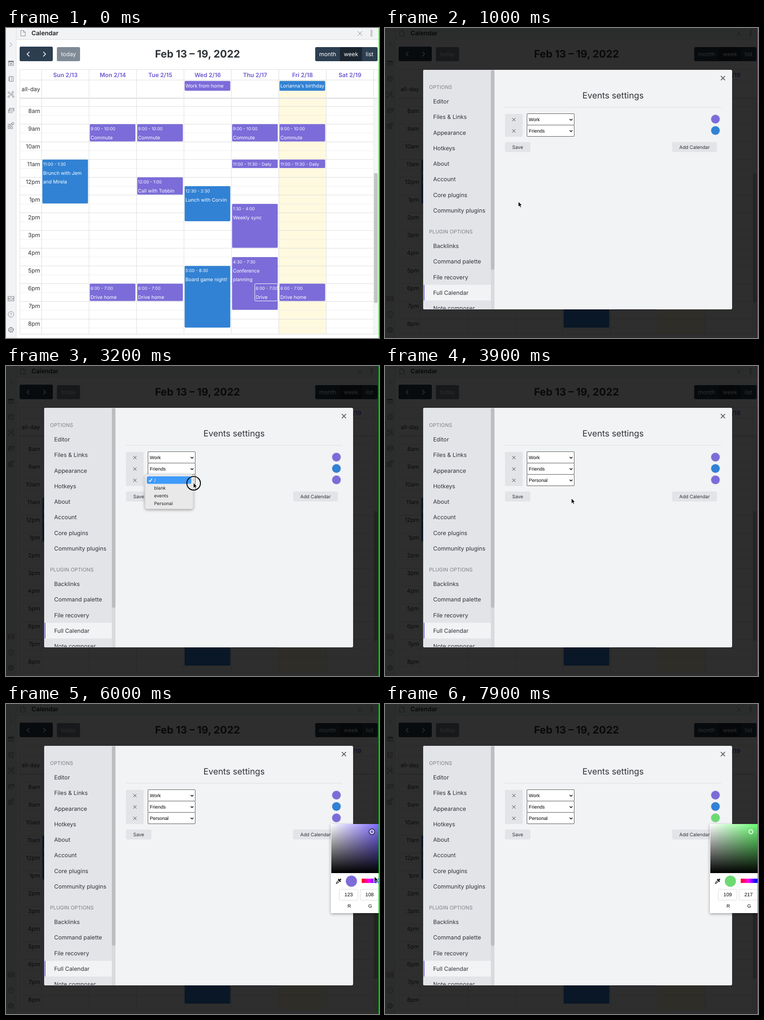
An HTML page that plays this animation: 821 by 682 pixels, repeating every 8000 ms.

```html
<!DOCTYPE html>
<html lang="en">
<head>
<meta charset="utf-8">
<title>Calendar</title>
<style>
html, body { margin: 0; width: 100%; height: 100%; overflow: hidden; background: #fff; }
svg { display: block; width: 821px; height: 682px; }
text { font-family: Inter, sans-serif; text-rendering: geometricPrecision; white-space: pre; }
.arial { font-family: "Liberation Sans", Arial, sans-serif; }
</style>
</head>
<body>
<svg id="stage" viewBox="0 0 821 682" xmlns="http://www.w3.org/2000/svg"></svg>
<script>
const LOOP = 8000, STEP = 100;
const PURPLE = '#7b6cd9', BLUE = '#3182d4', INK = '#2e3338', GRID = '#dddddd', PANEL = '#f2f3f5';
const BODY = 12.6, SMALL = 10.65;

const rect = (x, y, w, h, fill, more = '') =>
  `<rect x="${x}" y="${y}" width="${w}" height="${h}" fill="${fill}" ${more}/>`;
const circle = (x, y, r, fill, more = '') => `<circle cx="${x}" cy="${y}" r="${r}" fill="${fill}" ${more}/>`;
const text = (x, y, s, size, fill = INK, more = '') =>
  `<text x="${x}" y="${y}" font-size="${size}" fill="${fill}" ${more}>${s}</text>`;
const line = (d, color, w = 1, more = '') =>
  `<path d="${d}" fill="none" stroke="${color}" stroke-width="${w}" ${more}/>`;
const cross = (x, y, r, color, w) => line(`M${x - r} ${y - r}l${2 * r} ${2 * r}m0 ${-2 * r}l${-2 * r} ${2 * r}`, color, w);
const MID = 'text-anchor="middle"', END = 'text-anchor="end"';

// Calendar
const colX = c => 78.5 + 104.4 * c;
const hourY = h => 172.5 + 39 * (h - 8);

function eventBox(col, from, to, color, time, lines = [], inset = 0) {
  const x = colX(col) + 1.5 + inset, y = hourY(from), w = 100.5 - inset;
  let s = rect(x, y, w, (to - from) * 39 - 1, color, `rx="2" ${inset ? 'stroke="#fff"' : ''}`);
  s += text(x + 1.8, y + 13.6, time, 9.4, '#fff');
  lines.forEach((l, i) => s += text(x + 1.8, y + 33.6 + 19 * i, l, SMALL, '#fff'));
  return s;
}

function sideIcons() {
  const p = (d, w = 1) => line(d, '#85878a', w);
  return p('M8 31.5l5 5l-5 5') +
    rect(5.5, 72.5, 11, 10, 'none', 'stroke="#85878a"') + rect(5.5, 72.5, 11, 3, '#85878a') + p('M8 79h6', 2) +
    p('M7 106.5h9v11h-9zM5 109h4M5 112h4M5 115h4M11 109h3M11 112h3M11 115h3') +
    p('M11 146l-5-4M11 146l4-5M11 146l-5 5M11 146l5 4M11 146h6') +
    [[11, 146], [6, 142], [15, 141], [6, 151], [16, 151]].map(([x, y]) => circle(x, y, 1.8, PANEL, 'stroke="#85878a"')).join('') +
    p('M7.5 176.5h10v6h-10zM5.5 179v7h9.5M8 179h9', 1.2) +
    p('M4.5 211.5h4v4h-4zM4.5 217.5h4v4h-4zM10.5 217.5h4v4h-4zM10 211h4v4h-4zM13 208h4v4h-4z') +
    p('M4.5 590.5h13v10h-13z', 1.2) + circle(11, 595.5, 2.7, 'none', 'stroke="#85878a"') + p('M6.5 593v5M15.5 593v5') +
    circle(11, 630, 6.3, 'none', 'stroke="#85878a"') + text(11, 633.5, '?', 9.5, '#85878a', MID) +
    circle(11, 664, 5.3, 'none', 'stroke="#85878a" stroke-width="2" stroke-dasharray="2.4 1.76"') +
    circle(11, 664, 4.3, 'none', 'stroke="#85878a"') + circle(11, 664, 1.6, 'none', 'stroke="#85878a"');
}

function calendar() {
  let s = rect(0, 0, 821, 682, '#fff') + rect(0, 0, 821, 25, PANEL) + rect(0, 0, 22, 682, PANEL) +
    line('M22.5 0V682M22 25.5H821', '#dcddde') + sideIcons() +
    line('M32.5 5.5h6l4 4v8h-10zM38.5 5.5v4h4', '#85878a') +
    text(56, 15.7, 'Calendar', 13.6, '#222', 'font-weight="600"') + cross(779, 12, 4.8, '#85878a', 1) +
    [6.5, 11.5, 16.5].map(y => circle(804.5, y, 1.6, 'none', 'stroke="#85878a"')).join('');

  s += rect(30, 41, 73, 32, '#2c3e50', 'rx="3"') +
    line('M51.5 52.5l-5 5l5 5M82 52.5l5 5l-5 5', '#fff', 1.7) +
    rect(112, 42, 51, 31, '#7e8a96', 'rx="3"') + text(137.5, 62, 'today', BODY, '#f6f7f8', MID) +
    text(421.5, 65, 'Feb 13 – 19, 2022', 22.75, INK, MID + ' font-weight="700"') +
    rect(680.5, 42, 137.5, 31, '#2c3e50', 'rx="3"') + rect(735, 42, 48.5, 31, '#1a252f');
  [['month', 708], ['week', 759.3], ['list', 800.3]].forEach(([l, x]) => s += text(x, 62, l, BODY, '#fff', MID));

  s += rect(colX(5), 114, 104.4, 560, '#fff9df');
  let solid = 'M30.5 91.5H818.5V673.5H30.5zM30.5 114.5H818', dots = '';
  for (let c = 0; c < 8; c++) solid += `M${colX(c)} 91.5V673.5`;
  for (let h = 8; h <= 20; h++) {
    solid += `M30.5 ${hourY(h)}H809`;
    dots += `M30.5 ${hourY(h) + 19.5}H809`;
  }
  s += line(solid, GRID) + line(dots, GRID, 1, 'stroke-dasharray="1 1"') +
    rect(31, 153, 787, 3, '#e4e4e4') + rect(809.5, 156, 8.5, 517, '#f6f6f6') +
    rect(810, 319, 8, 286, '#c4c4c4', 'rx="4"');

  'Sun Mon Tue Wed Thu Fri Sat'.split(' ').forEach((d, c) =>
    s += text(colX(c) + 52.2, 107.7, `${d} 2/${13 + c}`, 12.9, '#6c59d0', MID + ' font-weight="600"'));
  s += text(75, 139, 'all-day', BODY, INK, END);
  for (let h = 8; h <= 20; h++)
    s += text(75, hourY(h) + 14.6, (h > 12 ? h - 12 : h) + (h < 12 ? 'am' : 'pm'), BODY, INK, END);

  [[3, PURPLE, 'Work from home'], [5, BLUE, "Lorianna's birthday"]].forEach(([c, fill, label]) =>
    s += rect(colX(c) + 1.5, 116.5, 100.5, 21.5, fill, 'rx="2"') + text(colX(c) + 3.3, 131.2, label, SMALL, '#fff'));
  for (const c of [1, 2, 4, 5]) s += eventBox(c, 9, 10, PURPLE, '9:00 - 10:00', ['Commute']);
  for (const c of [4, 5]) s += eventBox(c, 11, 11.5, PURPLE, '11:00 - 11:30 - Daily');
  for (const c of [1, 2, 5]) s += eventBox(c, 18, 19, PURPLE, '6:00 - 7:00', ['Drive home']);
  return s +
    eventBox(0, 11, 13.5, BLUE, '11:00 - 1:30', ['Brunch with Jem', 'and Mirela']) +
    eventBox(2, 12, 13, PURPLE, '12:00 - 1:00', ['Call with Tobbin']) +
    eventBox(3, 12.5, 14.5, BLUE, '12:30 - 2:30', ['Lunch with Corvin']) +
    eventBox(3, 17, 20.5, BLUE, '5:00 - 8:30', ['Board game night!']) +
    eventBox(4, 13.5, 16, PURPLE, '1:30 - 4:00', ['Weekly sync']) +
    eventBox(4, 16.5, 19.5, PURPLE, '4:30 - 7:30', ['Conference', 'planning']) +
    eventBox(4, 18, 19, PURPLE, '6:00 - 7:00', ['Drive'], 50);
}

// Settings window
function settingsRow(y, label, color, id = '') {
  return rect(264, y - 12, 39, 25, '#e3e4e8', 'rx="2"') + cross(283.7, y + .5, 3.5, INK, 1) +
    rect(312.5, y - 12.5, 104, 25, '#fff', 'rx="1.5" stroke="#555"') +
    text(316.5, y + 3.8, label, 10.5, '#000', `class="arial" ${id && `id="${id}Name"`}`) +
    line(`M406.5 ${y - 1}l3 3l3-3`, '#111', 1.6) +
    circle(727.3, y - .5, 10.4, '#dadce3') + circle(727.3, y - .5, 9.4, color, id && `id="${id}Dot"`);
}

function settings() {
  let s = rect(0, 0, 821, 682, '#000', 'opacity=".82"') + rect(84, 92, 680, 527, PANEL, 'rx="3"') +
    rect(84, 92, 157, 527, '#e3e4e8', 'rx="3"') + rect(233, 92, 8, 527, '#d9dade') +
    rect(233, 93, 8, 439, '#bdbec1', 'rx="4"') +
    rect(85, 565, 148, 34.5, PANEL) + rect(85, 565, 2, 34.5, PURPLE);
  const list = (title, y, items, first) => {
    s += text(97, y, title, 11.1, '#7c7f84', 'letter-spacing=".15"');
    items.split(',').forEach((it, i) => s += text(106, first + 34.28 * i, it, BODY));
  };
  s += '<g clip-path="url(#modalClip)">';
  list('OPTIONS', 134, 'Editor,Files &amp; Links,Appearance,Hotkeys,About,Account,Core plugins,Community plugins', 166);
  list('PLUGIN OPTIONS', 452, 'Backlinks,Command palette,File recovery,Full Calendar,Note composer', 484.2);
  return s + '</g>' + cross(743.8, 110.3, 4.6, '#5c5e62', 1.9) +
    text(502, 155, 'Events settings', 18.8, INK, MID) + line('M264 174.5H740', '#dcddde') +
    settingsRow(201, 'Work', PURPLE) + settingsRow(226, 'Friends', BLUE) +
    `<g id="newRow">${settingsRow(251, '/', PURPLE, 'new')}</g><g id="buttons">` +
    rect(264, 251, 56, 22, '#e3e4e8', 'rx="3"') + text(292, 266, 'Save', 10.4, INK, MID) +
    rect(632, 251, 98.5, 22, '#e3e4e8', 'rx="3"') + text(681.3, 266, 'Add Calendar', 10.4, INK, MID) + '</g>';
}

const MENU = ['/', 'blank', 'events', 'Personal'];
const menu = () => rect(306, 238, 106, 76.5, '#e9e9ea', 'rx="5" stroke="#c4c4c6" stroke-width=".6" filter="url(#shadow)"') +
  rect(310, 243, 98, 16.5, '#3f9bfc', 'id="menuBar" rx="3.5"') +
  line('M314.5 251.5l2.5 3l4.5-7', '#fff', 1.6, 'id="check"') +
  MENU.map((m, i) => text(326, 254.8 + 17 * i, m, 10, '#222', 'class="item"')).join('');

const picker = () => rect(715, 264, 226, 196, '#fff', 'filter="url(#shadow)"') +
  rect(716, 264, 178, 108, '#00f', 'id="field"') + rect(716, 264, 178, 108, 'url(#toWhite)') + rect(716, 264, 178, 108, 'url(#toBlack)') +
  circle(805.3, 281, 6, 'none', 'id="focus" stroke="#111" stroke-width="1.6"') +
  circle(805.3, 281, 4.3, 'none', 'stroke="#fff" stroke-width="1.8"') +
  line('M727 395l1-3l5-5l2 2l-5 5z', '#111', 1.2) + line('M732 386l4 4M734 388l2.5-2.5', '#111', 2.6, 'stroke-linecap="round"') +
  circle(760.2, 389.8, 12.3, PURPLE, 'id="preview"') +
  rect(783, 384.3, 100, 9.4, 'url(#hues)') + circle(814, 389, 5.5, '#00f', 'id="thumb" stroke="#fff" stroke-width="1.2"') +
  [['R', 734], ['G', 780]].map(([l, x]) => rect(x - .5, 407.5, 41, 24, '#fff', 'rx="2" stroke="#dadada"') +
    text(x + 20.3, 423.3, '', 11, '#000', `class="arial" id="num${l}" ${MID}`) +
    text(x + 21.5, 448, l, 10.4, '#000', 'class="arial" ' + MID)).join('');

const stop = (o, c, a = 1) => `<stop offset="${o}" stop-color="${c}" stop-opacity="${a}"/>`;
document.getElementById('stage').innerHTML = `<defs>
  <clipPath id="modalClip">${rect(84, 92, 149, 526, '#000')}</clipPath>
  <filter id="shadow" x="-20%" y="-20%" width="140%" height="140%"><feDropShadow dx="0" dy="2" stdDeviation="3" flood-opacity=".35"/></filter>
  <linearGradient id="toWhite">${stop(0, '#fff') + stop(1, '#fff', 0)}</linearGradient>
  <linearGradient id="toBlack" x2="0" y2="1">${stop(0, '#000', 0) + stop(1, '#000')}</linearGradient>
  <linearGradient id="hues">${[0, 1, 2, 3, 4, 5, 6].map(i => stop(i / 6, `hsl(${360 - 60 * i},100%,50%)`)).join('')}</linearGradient>
  </defs>${calendar()}<g id="settings">${settings()}</g><g id="menu">${menu()}</g><g id="picker">${picker()}</g>
  <rect id="edge" x="820" y="0" width="1" height="682"/>
  ${circle(0, 0, 15, 'none', 'id="ring" stroke="#111" stroke-width="2.2"')}
  <g id="cursor"><path id="arrow" d="M0 0V11.5L2.7 9.1L4.5 13.2L6.5 12.3L4.7 8.3H8.3Z" fill="#000" stroke="#fff" stroke-width=".9"/>
  <path id="hand" d="M-1.2 .8Q0-.6 1.2 .8V4.5L5.5 5.5Q6.5 6 6.3 7.5L5.3 12.5H-1.2L-4.2 8Q-4.5 6.5-3 6.6L-1.2 8Z" fill="#fff" stroke="#111" stroke-width="1"/></g>`;

const el = {};
document.querySelectorAll('[id]').forEach(n => el[n.id] = n);
const items = [...document.querySelectorAll('.item')];
const show = (n, on) => n.setAttribute('display', on ? 'inline' : 'none');
const set = (n, attrs) => { for (const k in attrs) n.setAttribute(k, attrs[k]); };

// Motion: [time, ...values]
const PATH = [
  [600, 300, 690], [900, 293.5, 382], [1200, 293.5, 382], [1700, 690, 257], [2100, 690, 257],
  [2900, 412.5, 257], [3200, 412.5, 257], [3600, 352, 298], [3800, 352, 298], [4200, 724.5, 254],
  [4400, 724.5, 254], [5200, 768, 284], [5600, 800, 408], [6000, 811, 379.5], [6200, 814, 385]
];
const HUE = [[6200, 248.3, 109], [7000, 176, 108], [7800, 123.3, 108]]; // hue, chroma

function track(keys, t) {
  let i = 0;
  while (i < keys.length - 2 && t > keys[i + 1][0]) i++;
  const [a, b] = [keys[i], keys[i + 1]];
  const k = Math.min(1, Math.max(0, (t - a[0]) / (b[0] - a[0])));
  const e = k * k * (3 - 2 * k);
  return a.slice(1).map((v, j) => v + (b[j + 1] - v) * e);
}

function toRgb(hue, chroma) {
  const channel = n => {
    const k = (n + hue / 60) % 6;
    return Math.round(217 - chroma * Math.max(0, Math.min(k, 4 - k, 1)));
  };
  return [channel(5), channel(3), channel(1)];
}

function draw(t) {
  const open = t >= 1000, added = t >= 1900, picking = t >= 4400;
  const [hue, chroma] = track(HUE, t), thumbX = 783 + (360 - hue) * .278;
  const rgb = toRgb(hue, chroma), color = `rgb(${rgb})`;
  let [x, y] = track(PATH, t);
  if (t > 6200) x = thumbX;

  show(el.settings, open);
  show(el.newRow, added);
  el.buttons.setAttribute('transform', `translate(0 ${added ? 25 : 0})`);
  el.newName.textContent = t >= 3900 ? 'Personal' : '/';
  el.newDot.setAttribute('fill', color);
  el.edge.setAttribute('fill', open ? '#00d010' : '#55ee44');

  show(el.menu, t >= 3100 && t < 3900);
  const pick = Math.max(0, Math.min(3, Math.floor((y - 243) / 17)));
  el.menuBar.setAttribute('y', 242.8 + 17 * pick);
  el.check.setAttribute('stroke', pick ? '#222' : '#fff');
  items.forEach((n, i) => n.setAttribute('fill', i === pick ? '#fff' : '#222'));

  show(el.picker, picking);
  el.field.setAttribute('fill', `hsl(${hue},100%,50%)`);
  el.preview.setAttribute('fill', color);
  set(el.thumb, { cx: thumbX, fill: `hsl(${hue},100%,50%)` });
  show(el.focus, t < 6200);
  el.numR.textContent = rgb[0];
  el.numG.textContent = rgb[1];

  const since = [1700, 3100].map(c => t - c).find(d => d >= 0 && d < 400);
  show(el.ring, since !== undefined);
  const grow = Math.max(0, (since || 0) - 100) / 200;
  set(el.ring, { cx: x + .5, cy: y + 1, r: 15 + 18 * Math.min(1, grow), opacity: Math.max(0, 1 - grow * .65) });

  const hand = (t >= 1600 && t < 2300) || (t >= 4200 && t < 4500);
  show(el.arrow, !hand);
  show(el.hand, hand);
  show(el.cursor, t >= 700);
  el.cursor.setAttribute('transform', `translate(${x} ${y})`);
}

const start = performance.now();
function tick() {
  const t = (performance.now() - start) % LOOP;
  draw(Math.floor(t / STEP) * STEP);
  requestAnimationFrame(tick);
}
tick();
</script>
</body>
</html>
```
